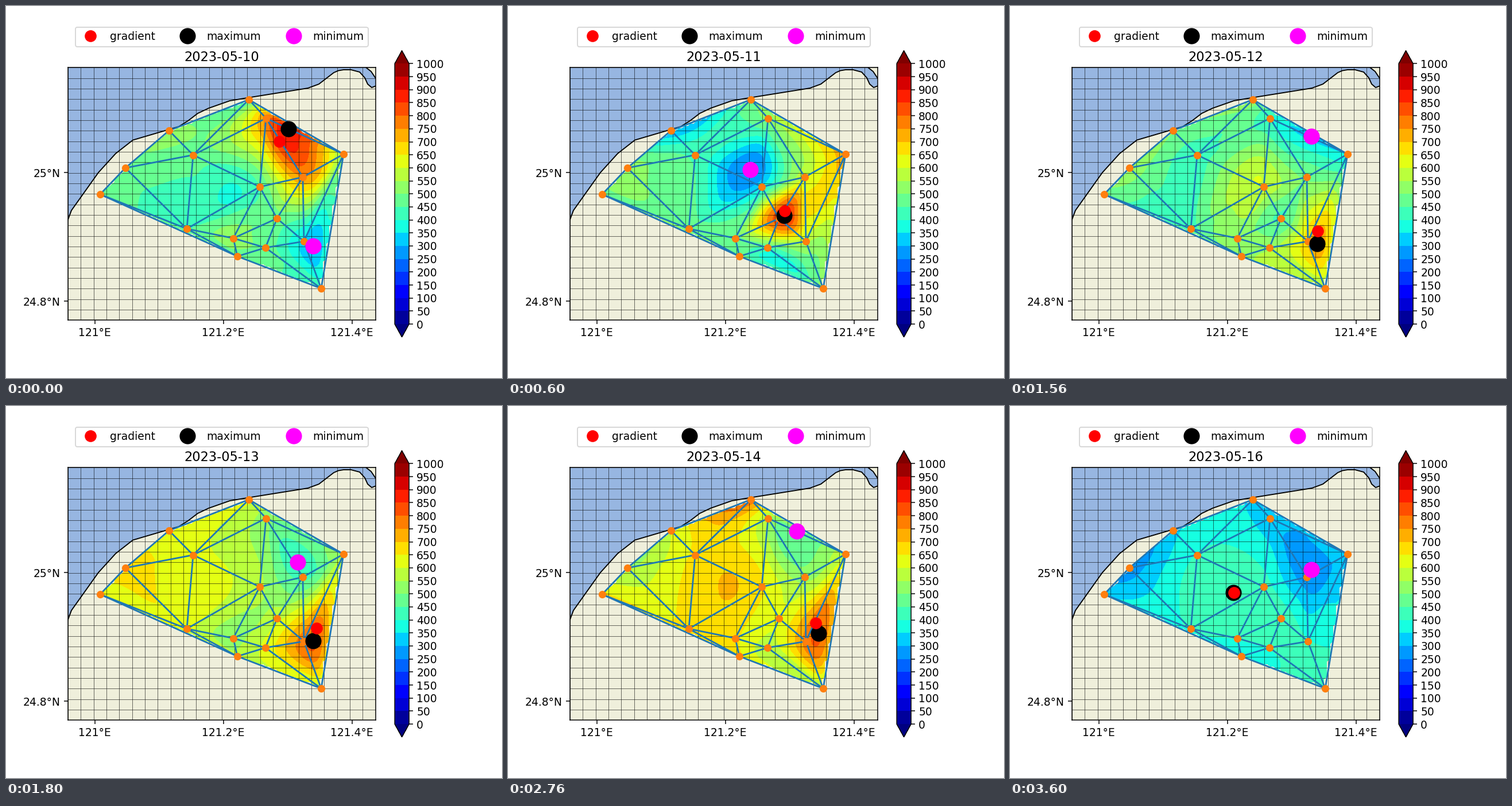
These frames come from a looping animation (864 px wide and 648 px high, 4200 ms). A matplotlib script:

```python
import numpy as np
import matplotlib.pyplot as plt
from matplotlib.animation import FuncAnimation
from matplotlib.tri import CubicTriInterpolator, Triangulation

# Map extent in stage pixels
LEFT, RIGHT, TOP, BOTTOM = 108, 643.68, 107.2, 547.2
OCEAN = (0.59375, 0.71484375, 0.8828125)
LAND = (0.9375, 0.9375, 0.859375)
LEVELS = np.arange(0, 1050, 50)

STATIONS = dict(
    A=(164, 328), B=(208, 282), C=(284, 217), D=(326, 259.5),
    E=(423, 163), F=(453, 195.5), G=(588, 258), H=(517, 298),
    I=(442, 315), J=(472, 370), K=(315, 388), L=(396, 404.5),
    M=(403, 436), N=(452, 421), O=(519, 410), P=(549, 492))
POINTS = np.array(list(STATIONS.values()))

# Per day: usual reading, gradient marker, stations that stand out
DAYS = [
    (480, (476, 236), dict(F=770, H=745, O=335, E=430, P=430, G=520, C=520,
                           L=520, K=445, I=450)),
    (480, (482, 357), dict(C=295, I=350, J=840, G=740, H=590, O=560, B=530,
                           F=520, P=520, D=440, N=440)),
    (540, (536, 392), dict(D=430, K=430, F=400, G=345, H=490, I=590, J=445,
                           O=690, A=480, C=505)),
    (615, (541, 387), dict(B=670, F=520, G=560, H=435, I=560, J=580, L=530,
                           M=560, O=785, P=570)),
    (660, (536, 378), dict(E=800, O=770, B=540, C=600, F=550, G=590, H=530,
                           J=610, N=575, P=560)),
    (492, (455, 196.5), dict(B=530, C=520, E=525, F=540, H=507, N=522, M=502,
                             O=470, G=478)),
    (402, (390, 325), dict(A=340, B=265, C=335, E=340, F=320, G=355, H=270,
                           I=420, J=425, M=380, P=450)),
]

COAST = [
    (104, 383), (108, 372), (114, 356), (161, 290), (191, 257), (221, 233.5),
    (301, 210), (317, 200), (334, 187), (353, 178), (390, 165),
    (423, 159.5), (526, 143), (545, 136), (571, 116), (579, 112.5),
    (588, 111), (601, 111), (616, 115), (625, 125), (630, 136),
    (637, 142), (650, 137)]
FAR_BANK = [(622, 102), (627, 107), (636, 114), (644, 126), (650, 135)]

fig, ax = plt.subplots(figsize=(6.4, 4.8), dpi=135)
ax.set(xlim=(LEFT, RIGHT), ylim=(BOTTOM, TOP), aspect="equal", facecolor=OCEAN)
ax.set_xticks([154.5, 378.5, 602.6], ["121°E", "121.2°E", "121.4°E"])
ax.set_yticks([290, 514], ["25°N", "24.8°N"])


def draw_land(shore, corners):
    ax.fill(*zip(*shore, *corners), fc=LAND, ec="none", zorder=0.5)
    ax.plot(*zip(*shore), color="black", lw=1, zorder=0.6)


draw_land(COAST, [(650, 560), (100, 560)])
draw_land(FAR_BANK, [(650, 100)])

xs = np.linspace(LEFT, RIGHT, 100)
ys = np.linspace(BOTTOM, TOP, 100)
grid_x, grid_y = np.meshgrid(xs, ys)
mesh = Triangulation(*POINTS.T)


def smooth_slopes(values):
    """Slopes at the stations that bend least along the mesh edges."""
    n = len(POINTS)
    lhs, rhs = np.zeros((n, 2, n, 2)), np.zeros((n, 2))
    for i, j in np.vstack([mesh.edges, mesh.edges[:, ::-1]]):
        edge = POINTS[j] - POINTS[i]
        scale = np.hypot(*edge) ** 3
        bend = np.outer(edge, edge) / scale
        lhs[i, :, i] += 4 * bend
        lhs[i, :, j] += 2 * bend
        rhs[i] += 6 * (values[j] - values[i]) * edge / scale
    return np.linalg.solve(lhs.reshape(2 * n, 2 * n), rhs.ravel()).reshape(n, 2)


def make_field(usual, readings):
    values = np.array([readings.get(name, usual) for name in STATIONS], float)
    surface = CubicTriInterpolator(mesh, values, kind="user",
                                   dz=tuple(smooth_slopes(values).T))
    return surface(grid_x, grid_y)


def cell_position(index):
    row, col = np.unravel_index(index, grid_x.shape)
    return xs[col], ys[row]


fields = [make_field(usual, readings) for usual, _, readings in DAYS]
contours = [ax.contourf(grid_x, grid_y, field, levels=LEVELS, cmap="jet",
                        extend="both", zorder=1) for field in fields]
fig.colorbar(contours[0], ax=ax, ticks=LEVELS)

grid_style = dict(color="black", lw=0.3, zorder=1.5)
ax.vlines(np.linspace(LEFT, RIGHT, 25), TOP, BOTTOM, **grid_style)
ax.hlines(np.linspace(BOTTOM, TOP, 25), LEFT, RIGHT, **grid_style)
ax.triplot(mesh, color="C0", lw=1.5, zorder=2)
ax.plot(*POINTS.T, "o", color="C1", ms=6, zorder=3)


def add_marker(label, color, size, zorder):
    return ax.plot([], [], "o", color=color, ms=size, label=label, zorder=zorder)[0]


gradient = add_marker("gradient", "red", 10, 6)
maximum = add_marker("maximum", "black", 14, 4)
minimum = add_marker("minimum", "magenta", 14, 5)
ax.legend(handles=[gradient, maximum, minimum], ncol=3, loc="upper center",
          bbox_to_anchor=(0.5, 1.182))
title = ax.set_title("")


def place(marker, position):
    x, y = position
    marker.set_data([x], [y])


def draw(day):
    for i, contour in enumerate(contours):
        contour.set_visible(i == day)
    place(gradient, DAYS[day][1])
    place(maximum, cell_position(fields[day].argmax()))
    place(minimum, cell_position(fields[day].argmin()))
    title.set_text(f"2023-05-{10 + day}")
    return [*contours, gradient, maximum, minimum, title]


anim = FuncAnimation(fig, draw, frames=len(DAYS), interval=600,
                     repeat=True, repeat_delay=0)
plt.show()
```
